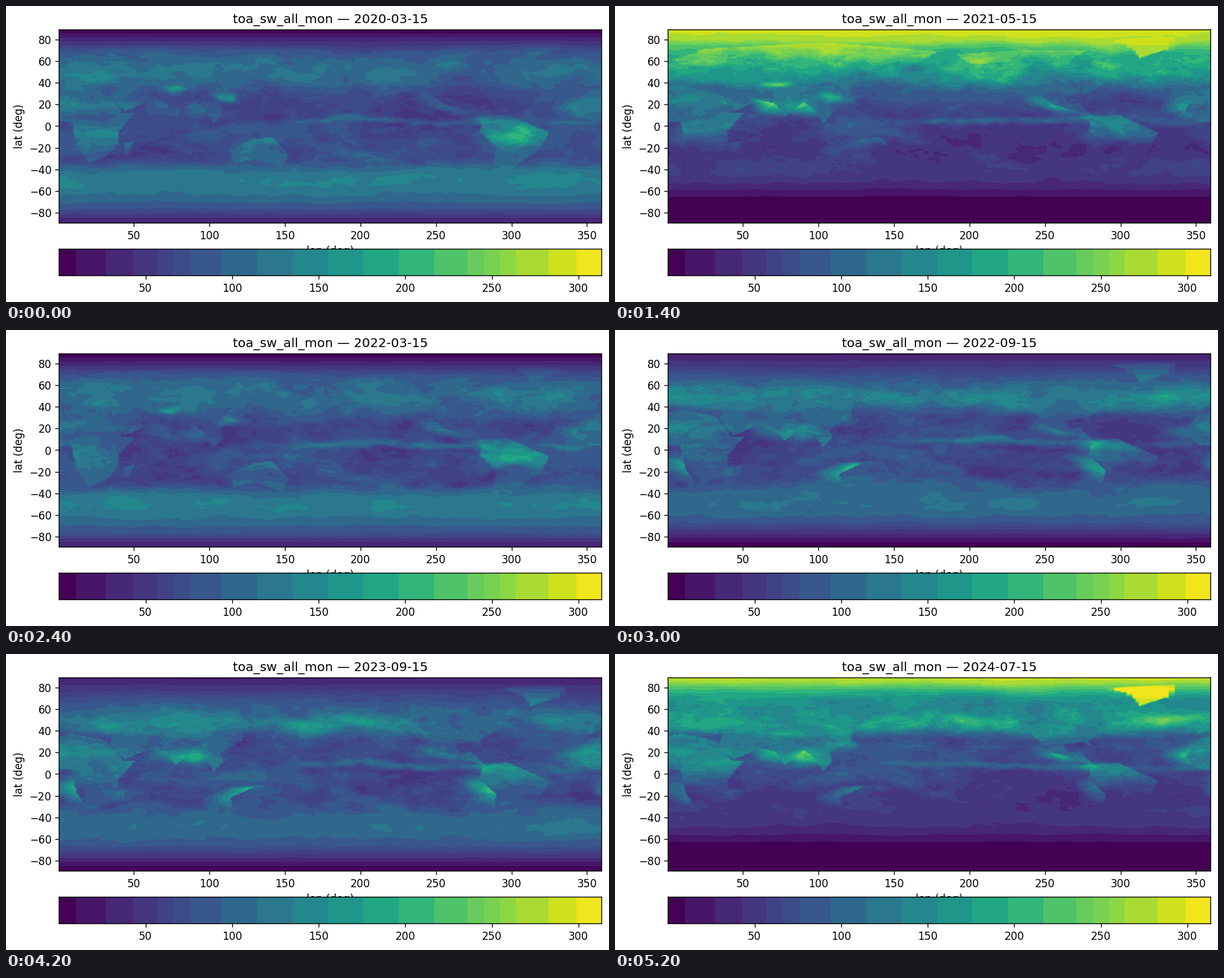
Recreate the animation shown at these times as a matplotlib script. Size 949 by 467 pixels, loop 5.3 s.

```python
import numpy as np
import matplotlib.pyplot as plt
from matplotlib.animation import FuncAnimation
from matplotlib.colors import BoundaryNorm, ListedColormap
from matplotlib.path import Path

W, H, DPI = 949, 467, 120
MONTHS = 53
VMAX = 313.3

plt.rcParams["font.family"] = "DejaVu Sans"

# Colour steps along the viridis scale
EDGES = np.r_[0, 10, 27, 43, 57, 66, 76, np.linspace(94, 217, 7),
              236, 246, 255, 264, 283, 299, VMAX]
MIDS = (EDGES[1:] + EDGES[:-1]) / 2
MIDS[0] = 0
CMAP = ListedColormap(plt.get_cmap("viridis")(MIDS / VMAX))
NORM = BoundaryNorm(EDGES, len(MIDS))

LON, LAT = np.meshgrid(np.arange(360) + 0.5, np.arange(180) - 89.5)

# Key points of the coasts: longitude east, latitude north
AFRICA = [(-17, 15), (-9, 32), (10, 37), (32, 31), (43, 12), (51, 12), (40, -5),
          (40, -15), (32, -28), (20, -34), (12, -17), (9, 4), (-8, 4)]
EURASIA = [(-9, 37), (-9, 43), (0, 48), (9, 56), (5, 61), (25, 71), (105, 77),
           (180, 69), (157, 52), (155, 60), (138, 54), (122, 39), (122, 30),
           (108, 20), (109, 11), (103, 2), (97, 16), (90, 22), (78, 8), (72, 20),
           (57, 26), (49, 30), (59, 22), (44, 13), (35, 28), (36, 37), (26, 38),
           (12, 45), (3, 43)]
NORTH_AMERICA = [(-168, 66), (-125, 70), (-82, 70), (-94, 60), (-80, 53), (-78, 62),
                 (-56, 52), (-81, 31), (-80, 25), (-84, 30), (-97, 27), (-94, 18),
                 (-87, 21), (-78, 8), (-105, 20), (-124, 42), (-135, 58), (-160, 57)]
SOUTH_AMERICA = [(-79, 8), (-62, 10), (-35, -6), (-39, -18), (-57, -37), (-69, -53),
                 (-74, -50), (-70, -19), (-81, -5)]
AUSTRALIA = [(114, -22), (130, -12), (142, -11), (153, -27), (148, -38), (131, -31),
             (116, -34)]
MADAGASCAR = [(44, -25), (44, -16), (50, -14), (47, -25)]
GREENLAND = [(-67, 78), (-60, 80), (-28, 82), (-24, 79), (-28, 71), (-42, 65),
             (-47, 62), (-50, 68), (-57, 75)]

# Regional clouds: lon, lat, x width, y width, albedo change, swing, peak month
REGIONS = [
    (90, 18, 18, 8, .11, 1, 7.5),       # monsoon
    (112, 27, 8, 4, .17, .4, 3),        # spring stratus
    (74, 37, 9, 3, .13, .9, 3),         # mountain snow
    (130, -2, 30, 7, .06, 0, 0),        # warm pool
    (297, -6, 14, 9, .10, .6, 2),       # rain forest
    (279, 6, 8, 4, .09, 0, 0),          # isthmus
    (230, 0, 40, 3, -.03, .3, 9),       # cold tongue
]


def inside(outline):
    path = Path(outline)
    hit = np.zeros(LON.size, bool)
    for shift in (0, 360):
        hit |= path.contains_points(np.c_[LON.ravel() - shift, LAT.ravel()])
    return hit.reshape(LON.shape)


def bell(x, centre, width, power=2):
    return np.exp(-np.abs((x - centre) / width) ** power)


def smoothstep(x):
    x = np.clip(x, 0, 1)
    return x * x * (3 - 2 * x)


def season(month, peak):
    return np.cos(2 * np.pi * (month - peak) / 12)


ICE = inside(GREENLAND)
LAND = np.any([inside(p) for p in (AFRICA, EURASIA, NORTH_AMERICA, SOUTH_AMERICA,
                                   AUSTRALIA, MADAGASCAR)], axis=0)
# Sea just west of a continent
WEST_COAST = ~LAND * np.mean([np.roll(LAND, -s, axis=1) for s in range(1, 19)], axis=0)

KX, KY = np.meshgrid(np.fft.fftfreq(360), np.fft.fftfreq(180))


def noise(seed, stretch=1.8, slope=1.7):
    """Smooth random field, longer from west to east, with unit spread."""
    white = np.random.default_rng(seed).normal(size=LON.shape)
    gain = (0.012 + np.hypot(stretch * KX, KY)) ** -slope
    field = np.fft.ifft2(np.fft.fft2(white) * gain).real
    return (field - field.mean()) / field.std()


STEADY = noise(7)


def sunlight(month):
    day = (month - 0.5) * 30.44
    dec = np.radians(23.44) * np.sin(2 * np.pi * (day - 81) / 365.25)
    phi = np.radians(LAT)
    h = np.arccos(np.clip(-np.tan(phi) * np.tan(dec), -1, 1))
    power = 1361 / np.pi * (1 + 0.033 * np.cos(2 * np.pi * (day - 3) / 365.25))
    return power * (h * np.sin(phi) * np.sin(dec) + np.cos(phi) * np.cos(dec) * np.sin(h))


def zonal(lat, month):
    """Mid-latitude cloud and polar ice, with a northern thaw that moves poleward."""
    far = np.abs(lat)
    ice = 0.16 + 0.34 * smoothstep((far - 18) / 45) + 0.17 * smoothstep((far - 58) / 32)
    thaw = np.maximum(season(month, 6.5 + (lat - 55) / 15), 0)
    return ice - 0.19 * bell(lat, 68, 25) * thaw * (lat > 0)


def over_land(lon, lat, month):
    rain = 0.13 * bell(lat, 7 * season(month, 8), 14)
    desert = 0.13 * bell(lat, 21, 8) * bell(lon % 360, 15, 48, 4)
    desert += 0.13 * bell(lat, 21, 8) * bell(lon % 360, 360, 25, 4)
    snow = 0.09 * bell(lat, 68, 12) * max(season(month, 4.5), 0)
    return 0.02 * bell(lat, 0, 45, 8) + rain + desert + snow


def over_sea(lat, month):
    summer = np.sign(lat) * season(month, 7.5)
    dry = -0.08 * bell(np.abs(lat), 33, 7) * np.maximum(summer, 0)
    fog = 0.06 * bell(lat, 48, 6) * np.maximum(summer, 0)
    spring = np.where(lat > 0, season(month, 6), season(month, 9))
    deck = 0.17 * WEST_COAST * bell(np.abs(lat), 17, 10) * (1 + 0.8 * spring)
    return dry + fog + deck


def rain_belts(lon, lat, month):
    centre = 6 + 1.5 * season(month, 8) + 0.8 * np.sin(np.radians(lon * 4))
    total = 0.10 * bell(lon, 215, 68, 4) * bell(lat, centre, 2.8)
    total += 0.07 * bell(lon, 335, 20, 4) * bell(lat, centre - 2, 2.5)
    slant = -5 - 0.4 * (lon - 150)
    return total + 0.06 * bell(lon, 192, 42, 4) * bell(lat, slant, 5)


def regions(lon, lat, month):
    return sum(amp * (1 + swing * season(month, peak)) * bell(lon, x, wx) * bell(lat, y, wy)
               for x, y, wx, wy, amp, swing, peak in REGIONS)


def coarsen(field):
    """Cells widen towards the poles."""
    out = field.copy()
    for limit, step in ((45, 2), (70, 4), (80, 8)):
        rows = np.abs(LAT[:, 0]) > limit
        means = field[rows].reshape(-1, 360 // step, step).mean(axis=2)
        out[rows] = means.repeat(step, axis=1)
    return out


def reflected(i):
    month = (i + 2) % 12 + 1
    cloud = 0.55 * STEADY + 0.8 * noise(100 + i)
    lon = LON + 4 * noise(300 + i, 1.2, 1.9)
    lat = LAT + 1.6 * noise(500 + i, 1.6, 1.9)

    albedo = zonal(LAT + 0.4 * (lat - LAT), month)
    albedo += np.where(LAND, over_land(lon, lat, month), over_sea(lat, month))
    albedo += rain_belts(lon, lat, month) + regions(lon, lat, month)

    calm = np.clip((82 - np.abs(LAT)) / 25, 0.12, 1) * np.where(LAT < -35, 0.5, 1)
    albedo *= 1 + 0.12 * cloud * calm
    albedo += 0.04 * bell(noise(700 + i, 1.5), 0, 0.12) * bell(LAT, 45, 22)
    albedo = np.clip(albedo, 0.11, 0.67)
    albedo[ICE] = 0.67
    return coarsen(sunlight(month) * albedo)


def title(i):
    year, month = divmod(i + 2, 12)
    return f"toa_sw_all_mon — {2020 + year}-{month + 1:02d}-15"


def add_axes(top, height):
    left, width = 83.3, 853.7
    return fig.add_axes([left / W, 1 - (top + height) / H, width / W, height / H])


fields = [reflected(i) for i in range(MONTHS)]

fig = plt.figure(figsize=((W + 0.001) / DPI, (H + 0.001) / DPI), dpi=DPI,
                 facecolor="white")
ax = add_axes(37, 305)
picture = ax.imshow(fields[0], cmap=CMAP, norm=NORM, origin="lower", aspect="auto",
                    extent=(0, 360, -90, 90), interpolation="bilinear")
ax.set(xlim=(0.5, 359.5), ylim=(-89.5, 89.5), xlabel="lon (deg)", ylabel="lat (deg)",
       xticks=range(50, 351, 50), yticks=range(-80, 81, 20))
heading = ax.set_title(title(0))

bar = add_axes(383.3, 42)
bar.imshow(np.linspace(0, VMAX - 0.01, 1708)[None], cmap=CMAP, norm=NORM, aspect="auto",
           extent=(0, VMAX, 0, 1), interpolation="nearest")
bar.set(xticks=range(50, 301, 50), yticks=[])


def draw(i):
    picture.set_data(fields[i])
    heading.set_text(title(i))
    return picture, heading


anim = FuncAnimation(fig, draw, frames=MONTHS, interval=100, repeat=True,
                     repeat_delay=0, blit=False)
plt.show()
```
